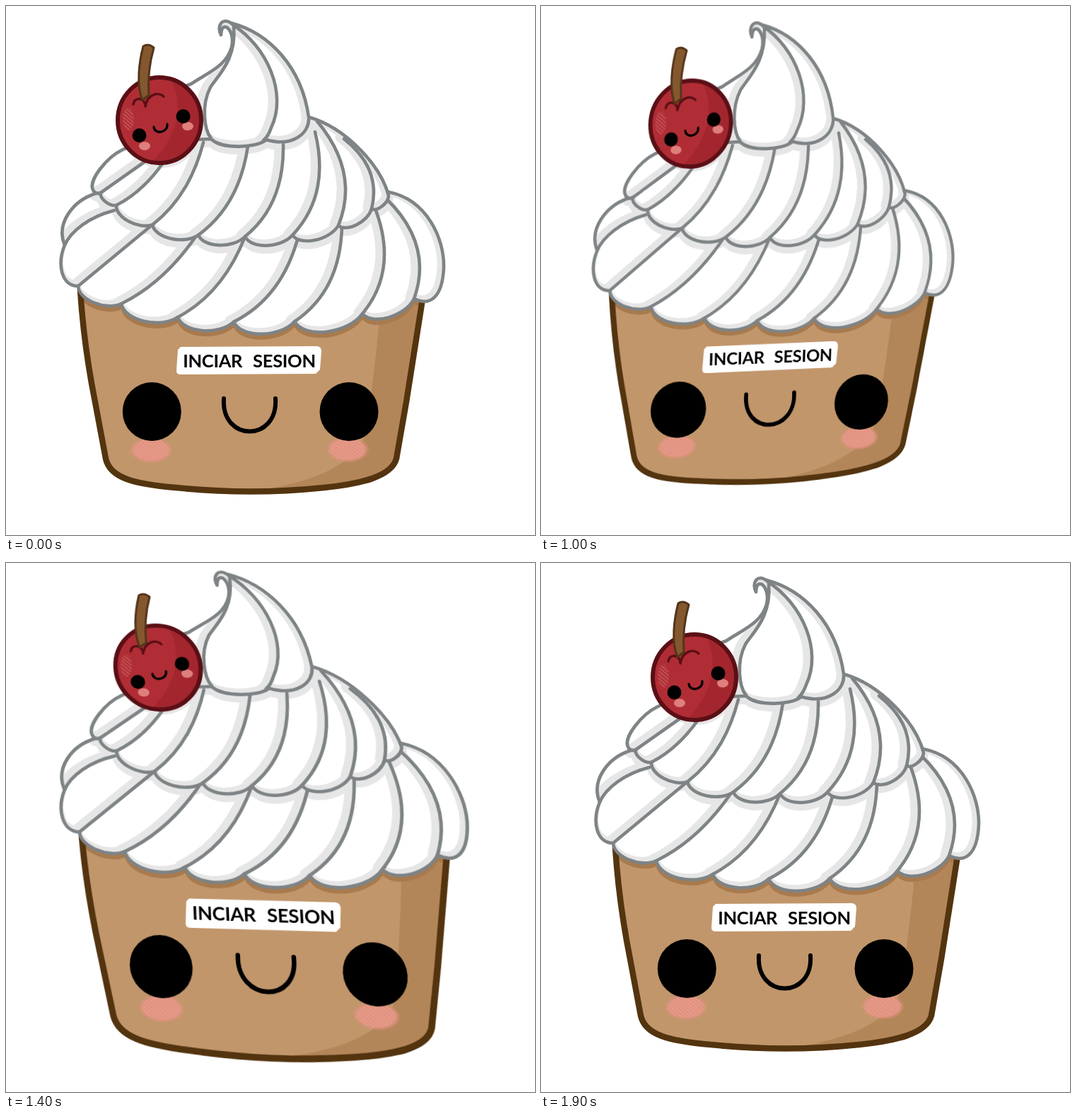
These frames come from a looping animation (748x748 px, 2.1 s). An HTML page:

```html
<!DOCTYPE html>
<html lang="es">
<head>
<meta charset="utf-8">
<title>Cupcake</title>
<style>
  html, body { margin: 0; width: 100%; height: 100%; overflow: hidden; background: #fff; }
  #cake {
    position: absolute; left: 0; top: 0; width: 748px; height: 748px; overflow: visible;
    transform-origin: 0 0;
    animation: wobble 2100ms step-end infinite;
  }
  @keyframes wobble {
    0%       { transform: none; }
    47.619%  { transform: var(--shrink); }
    57.1428% { transform: var(--swell); }
    66.6666% { transform: var(--lift); }
    76.1904% { transform: none; }
  }
  path, use { stroke-linecap: round; stroke-linejoin: round; }
  .white { fill: #fff; }
  .line { fill: none; stroke: #7e8385; stroke-width: 4.6; }
  .shade { fill: none; stroke: #e6e6e7; stroke-width: 13; }
  .smile { fill: none; stroke: #000; }
  text { font: 700 25.5px Lato, "Open Sans", sans-serif; letter-spacing: -.3px; word-spacing: 9px; }
</style>
</head>
<body>
<svg id="cake" viewBox="0 0 748 748">
  <defs>
    <path id="cup" d="M105 402 Q110 480 126 560 L141 640 C147 667 180 676 240 681
      Q345 692 450 681 C500 676 545 666 552 640 L566 560 L590 408 Z"/>
    <path id="low"/>
    <path id="lowCuts"/>
    <path id="mid"/>
    <path id="midCuts"/>
    <path id="top" d="M318 24 C372 38 418 86 428 157 C430 180 405 200 368 189 C355 201 305 203 290 188
      L240 190 V118 L262 110 C288 93 312 84 319 58 C322 45 318 34 312 30 C306 28 304 34 304 41
      C298 28 305 16 318 24 Z"/>
    <path id="topCuts" d="M322 30 C326 75 300 98 289 115 C276 140 280 175 290 187
      M320 26 C370 58 398 124 375 172 Q371 184 364 190"/>

    <clipPath id="inCup"><use href="#cup"/></clipPath>
    <clipPath id="inLow"><use href="#low"/></clipPath>
    <clipPath id="inMid"><use href="#mid"/></clipPath>
    <clipPath id="inTop"><use href="#top"/></clipPath>
    <ellipse id="cherry" cx="217" cy="161.500" rx="59" ry="60.500"/>
    <clipPath id="inCherry"><use href="#cherry"/></clipPath>

    <radialGradient id="rosy">
      <stop offset=".75" stop-color="#e2917f"/>
      <stop offset="1" stop-color="#e2917f" stop-opacity="0"/>
    </radialGradient>
    <pattern id="hatch" width="4" height="4" patternUnits="userSpaceOnUse" patternTransform="rotate(40)">
      <path d="M0 2H4" stroke="#f0b5a5" stroke-opacity=".5"/>
    </pattern>
    <g id="blush">
      <ellipse rx="31" ry="19" fill="url(#rosy)"/>
      <ellipse rx="27" ry="15" fill="url(#hatch)"/>
    </g>
  </defs>

  <!-- cup -->
  <use href="#cup" fill="#c1966b"/>
  <g clip-path="url(#inCup)">
    <path fill="#b38659" d="M530 400 C528 480 514 545 514 585 C508 640 450 668 375 682 L400 720 H620 V400 Z"/>
    <use href="#low" y="8" fill="#a87a4d"/>
  </g>
  <use href="#cup" fill="none" stroke="#53340f" stroke-width="8.500"/>

  <!-- cream, bottom tier upwards -->
  <use href="#low" class="white"/>
  <g clip-path="url(#inLow)">
    <use href="#low" x="-3" y="-2" class="shade"/>
    <use href="#lowCuts" x="-6" y="-2" class="shade"/>
    <use href="#mid" y="5" class="shade"/>
  </g>
  <use href="#lowCuts" class="line"/>
  <use href="#low" class="line"/>

  <use href="#mid" class="white"/>
  <g clip-path="url(#inMid)">
    <use href="#mid" x="-3" y="-2" class="shade"/>
    <use href="#midCuts" x="-6" y="-2" class="shade"/>
    <use href="#top" y="5" class="shade"/>
    <use href="#cherry" x="2" y="7" fill="#e6e6e7"/>
  </g>
  <use href="#midCuts" class="line"/>
  <use href="#mid" class="line"/>

  <use href="#top" class="white"/>
  <g clip-path="url(#inTop)">
    <use href="#top" x="-4" y="-2" class="shade"/>
    <use href="#topCuts" x="-6" class="shade"/>
  </g>
  <use href="#topCuts" class="line"/>
  <use href="#top" class="line"/>

  <!-- cherry -->
  <use href="#cherry" fill="#b02d35"/>
  <g clip-path="url(#inCherry)">
    <path fill="#a3262e" d="M228 95 C252 130 248 180 205 222 L290 230 V95 Z"/>
    <ellipse cx="173" cy="160" rx="8" ry="16" fill="url(#hatch)"/>
  </g>
  <use href="#cherry" fill="none" stroke="#5a0f15" stroke-width="6"/>
  <path fill="none" stroke="#5a0f15" stroke-width="3.4" d="M180 139 C182 127 197 130 197 142 C200 124 216 121 223 128"/>
  <path fill="#84582f" stroke="#54351a" stroke-width="3"
    d="M194 57 Q201 52 209 59 C203 80 200 100 202 126 L193 133 C184 112 188 80 194 57 Z"/>
  <g fill="#df7f7d">
    <ellipse cx="196" cy="198" rx="8" ry="6"/>
    <ellipse cx="257" cy="170" rx="8" ry="6"/>
  </g>
  <circle cx="188.500" cy="183" r="10"/>
  <circle cx="250.500" cy="156" r="10"/>
  <path class="smile" stroke-width="3.2" d="M209 171 C210 182 229 180 228 167"/>

  <!-- face and label -->
  <use href="#blush" x="205" y="628"/>
  <use href="#blush" x="483" y="627"/>
  <circle cx="206.300" cy="573.500" r="41.500"/>
  <circle cx="485" cy="573.500" r="41.500"/>
  <path class="smile" stroke-width="6" d="M308 555 C304 617 385 617 381 555"/>
  <path class="white" d="M247 482 L440 481 Q446 482 446 488 L444 514 L438 520 L247 521 Q241 521 241 516 L243 486 Z"/>
  <text x="344" y="510.500" text-anchor="middle">INCIAR SESION</text>
</svg>
<script>
  const byId = id => document.getElementById(id);

  // Point at fraction t from p to q, pushed sideways (down-right) by k chord lengths
  const along = ([px, py], [qx, qy], t, k) => {
    const dx = qx - px, dy = qy - py;
    return [px + dx * t - dy * k, py + dy * t + dx * k];
  };
  const scallop = (p, q) => `C${along(p, q, .12, .27)} ${along(p, q, .75, .27)} ${q}`;

  // Lower rim of a tier: flat in the middle, rising towards both ends
  const rim = (mid, half, base, drop, power) => x =>
    [x, base - drop * Math.abs((x - mid) / half) ** power];
  const midRim = rim(340, 206, 326, 62, 3);
  const lowRim = rim(360, 258, 447, 51, 2.5);

  // Scallops run between cusps; from each cusp a crease sweeps up, bowing more to the right
  function tier(id, left, cusps, tops, right, extra = '') {
    const scallops = cusps.slice(1).map((q, i) => scallop(cusps[i], q));
    const creases = tops.map((q, i) => {
      const bow = .32 * Math.sqrt(i / (tops.length - 1));
      return `M${cusps[i]} Q${along(cusps[i], q, .45, bow)} ${q}`;
    });
    byId(id).setAttribute('d', `${left} ${cusps[0]} ${scallops.join(' ')} ${right} Z`);
    byId(id + 'Cuts').setAttribute('d', extra + creases.join(' '));
  }

  tier('mid', 'M165 203 C142 214 116 247 123 260 Q126 267',
    [134, 156, 207, 272, 338, 405, 470, 517, 541].map(midRim),
    [[195, 221], [222, 222], [279, 193], [342, 198], [392, 196], [437, 178], [440, 163], [478, 188]],
    'C530 225 480 172 428 157 L280 150');

  tier('low', 'M127 265 C95 275 70 307 83 338 C72 365 78 396',
    [102, 163, 243, 322, 408, 504, 577].map(lowRim),
    [207, 270, 338, 414, 475, 521, 537].map(midRim),
    'C600 425 617 412 619 370 C620 330 596 274 541 263',
    'M153 289 C118 298 92 318 83 338 ');

  // Anchors: stem, right crease, right eye, left eye
  const rest = [[209, 58], [540, 263], [485, 573.5], [206, 573.5]];
  const poses = {
    shrink: [[206, 62], [514, 261], [453, 560], [194, 571]],
    swell:  [[200, 51], [549, 264], [506.5, 593.5], [210, 578]],
    lift:   [[203, 47], [558, 255], [522, 581.5], [219, 570.5]]
  };

  // Gauss-Jordan elimination on an augmented matrix
  function solve(m) {
    const n = m.length;
    for (let i = 0; i < n; i++) {
      let p = i;
      for (let r = i + 1; r < n; r++) if (Math.abs(m[r][i]) > Math.abs(m[p][i])) p = r;
      [m[i], m[p]] = [m[p], m[i]];
      m[i] = m[i].map(v => v / m[i][i]);
      for (let r = 0; r < n; r++) {
        if (r !== i) { const k = m[r][i]; m[r] = m[r].map((v, c) => v - k * m[i][c]); }
      }
    }
    return m.map(row => row[n]);
  }

  // Perspective map that carries the resting anchors to a pose
  function perspective(pose) {
    const [a, b, c, d, e, f, g, h] = solve(rest.flatMap(([x, y], i) => {
      const [u, v] = pose[i];
      return [[x, y, 1, 0, 0, 0, -u * x, -u * y, u], [0, 0, 0, x, y, 1, -v * x, -v * y, v]];
    }));
    const cells = [a, d, 0, g, b, e, 0, h, 0, 0, 1, 0, c, f, 0, 1];
    return `matrix3d(${cells.map(n => n.toFixed(9))})`;
  }

  for (const name in poses) byId('cake').style.setProperty('--' + name, perspective(poses[name]));
</script>
</body>
</html>
```
